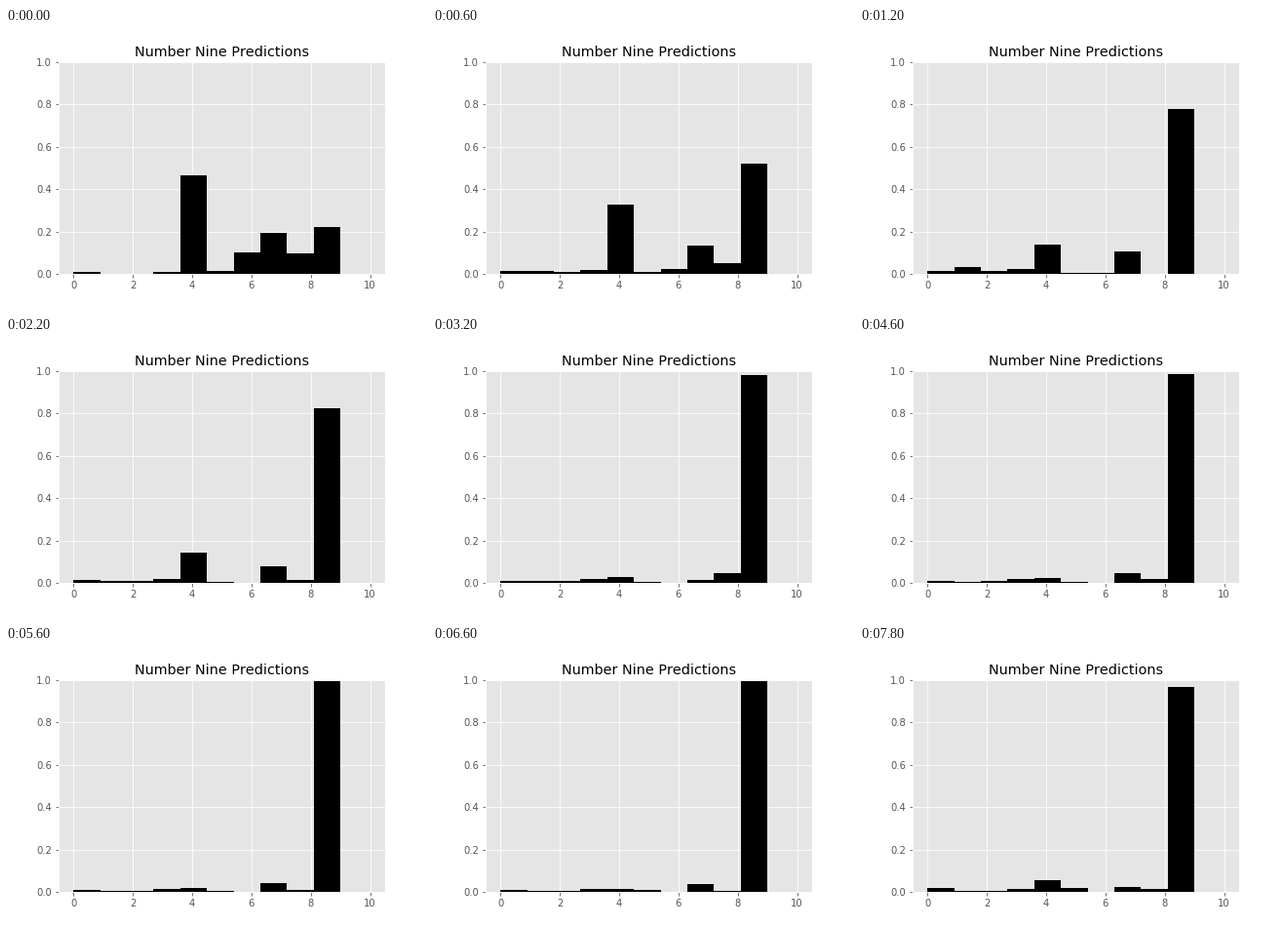
Write a matplotlib script that moves like this. It is 432 px wide and 288 px high and loops after 8 s.

```python
import numpy as np
import matplotlib.pyplot as plt
from matplotlib.animation import FuncAnimation

FRAMES, INTERVAL = 40, 200
SAMPLES, BINS = 250, 10
WIDTH = 9 / BINS

# Turning points of the digits most often mistaken for a nine
TURNS = [0, 6, 11, 12, 16, 23, 33, 39]
FOURS = [105, 31, 32, 7, 6, 5, 3, 12]
SEVENS = [43, 24, 18, 5, 3, 10, 8, 5]
EIGHTS = [22, 0, 3, 4, 10, 4, 1, 3]


def make_densities():
    t = np.arange(FRAMES)
    rng = np.random.default_rng(9)

    def track(points):
        wobble = rng.normal(0, 0.12, FRAMES)
        wobble[TURNS] = 0
        return np.interp(t, TURNS, points) * (1 + wobble)

    settle = 1 - np.exp(-t / 2)
    bump = np.exp(-((t - 6) / 3.5) ** 2)
    late = np.clip((t - 33) / 6, 0, 1)
    counts = np.round([
        2.4 + bump + 1.8 * late,
        settle * (2.2 - 0.04 * t + 5 * bump),
        settle * (2.2 - 0.03 * t + 1.2 * bump),
        2 + settle * (2.9 - 0.06 * t + 0.8 * bump),
        track(FOURS),
        0.55 + ((t - 17) / 11.5) ** 2,
        23 * np.exp(-t / 2),
        track(SEVENS),
        track(EIGHTS),
    ])
    # Every remaining sample is recognised as a nine
    nines = SAMPLES - counts.sum(axis=0)
    return np.vstack([counts, nines]).T / (SAMPLES * WIDTH)


densities = make_densities()

plt.style.use("ggplot")
plt.rcParams.update({"font.family": "DejaVu Sans", "text.kerning_factor": 6})
fig = plt.figure(figsize=(6, 4), dpi=72)
ax = fig.add_axes([0.125, 0.125, 0.775, 0.755])
ax.set_title("Number Nine Predictions")
bars = ax.bar(np.arange(BINS) * WIDTH, densities[0], WIDTH,
              align="edge", color="black")
ax.set_xlim(-0.5, 10.5)
ax.set_ylim(0, 1)
ax.set_xticks(range(0, 11, 2))
ax.set_yticks(np.linspace(0, 1, 6))


def update(i):
    for bar, height in zip(bars, densities[i]):
        bar.set_height(height)
    return list(bars)


anim = FuncAnimation(fig, update, frames=FRAMES, interval=INTERVAL,
                     init_func=lambda: update(0), repeat=True, repeat_delay=0)
plt.show()
```
